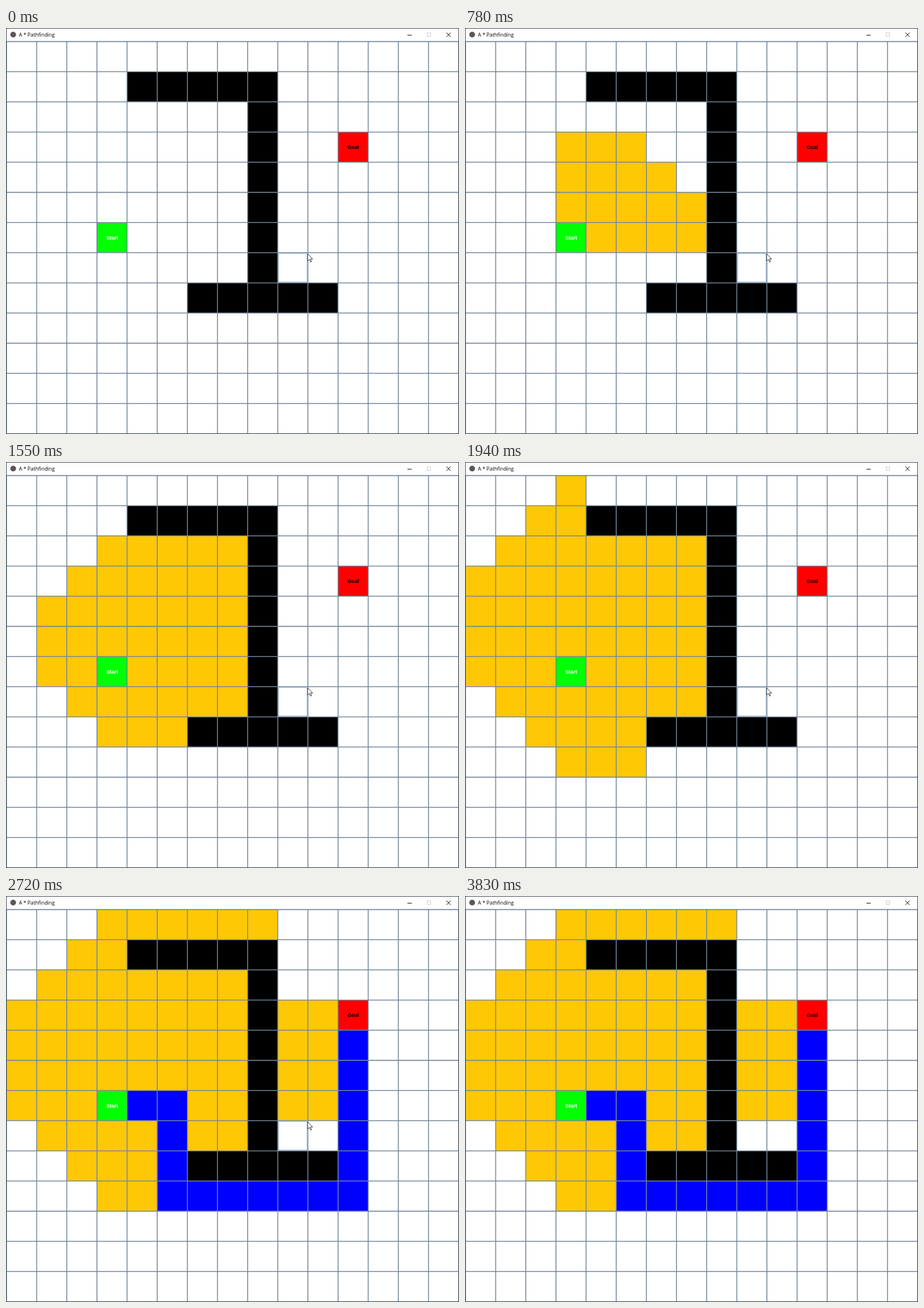
Write an HTML page that moves like this. It is 791x708 px and loops after 3910 ms.

```html
<!DOCTYPE html>
<html lang="en">
<head>
<meta charset="utf-8">
<title>A * Pathfinding</title>
<style>
  html, body { margin: 0; width: 100%; height: 100%; overflow: hidden; background: #fff; }
  svg { display: block; }
  .title { font: 8.9px "Open Sans", sans-serif; }
  .label { font: bold 9px "Liberation Sans", Arial, sans-serif; text-anchor: middle; }
</style>
</head>
<body>
<svg id="stage" width="791" height="708" viewBox="0 0 791 708">
  <rect width="791" height="708" fill="#fff"/>
  <g id="cells"></g>
  <path id="grid" fill="none" stroke="#74869a" stroke-width="1.55"/>
  <rect id="hover" width="50" height="50" fill="none" stroke="#a9bed3" stroke-width="1.7"/>
  <text class="label" x="185.5" y="369" fill="#fff">Start</text>
  <text class="label" x="606.5" y="211" fill="#000">Goal</text>
  <circle cx="12.5" cy="11.5" r="5" fill="#5c5658"/>
  <text class="title" x="22.5" y="15">A * Pathfinding</text>
  <g fill="none" stroke="#000">
    <path d="M701 12.5h7.5"/>
    <rect x="735.5" y="8.5" width="6" height="6" stroke="#ccc"/>
    <path d="M769 8l7.5 7.5M776.5 8l-7.5 7.5"/>
    <rect x=".5" y=".5" width="790" height="707" stroke="#3f4952"/>
  </g>
  <path id="cursor" d="M0 0v12.2l2.8-2.6 2 4.6 2-.9-2-4.4h3.9z" fill="#fff" stroke="#000" stroke-width=".8"/>
</svg>
<script>
const COLS = 15, ROWS = 13, PITCH = 52.63, LEFT = 0.9, TOP = 23.6, ROW_PITCH = 52.6;
const LOOP = 3910, SEARCH_START = 290, MS_PER_NODE = 29.5;
const SEARCH_TICKS = [
  320, 400, 480, 550, 630, 710, 780, 870, 950, 1030, 1100, 1180, 1250, 1320,
  1410, 1490, 1560, 1640, 1720, 1790, 1870, 1940, 2010, 2090, 2170, 2250, 2320, 2400,
  2490, 2570, 2640, 2720
];
const MOVE_TICKS = [3290, 3370, 3440, 3520, 3600, 3670, 3750];
const CURSOR_GONE = 3830;

const $ = id => document.getElementById(id);
const cellX = c => LEFT + c * PITCH;
const cellY = r => TOP + r * ROW_PITCH;

const isWall = (c, r) =>
  (r === 1 && c >= 4 && c <= 8) ||
  (c === 8 && r >= 1 && r <= 8) ||
  (r === 8 && c >= 6 && c <= 10);

const nodes = [];
for (let r = 0; r < ROWS; r++) {
  for (let c = 0; c < COLS; c++) {
    const rect = document.createElementNS("http://www.w3.org/2000/svg", "rect");
    const attrs = { x: cellX(c), y: cellY(r), width: PITCH, height: ROW_PITCH };
    for (const name in attrs) rect.setAttribute(name, attrs[name]);
    $("cells").append(rect);
    nodes.push({ c, r, rect, wall: isWall(c, r) });
  }
}
const nodeAt = (c, r) => c >= 0 && c < COLS && r >= 0 && r < ROWS ? nodes[r * COLS + c] : null;
const start = nodeAt(3, 6), goal = nodeAt(11, 3);
const distance = (a, b) => Math.abs(a.c - b.c) + Math.abs(a.r - b.r);

// Costs are plain Manhattan distances; ties go to the node nearest the start.
function search() {
  for (const n of nodes) {
    n.g = distance(n, start);
    n.f = n.g + distance(n, goal);
  }
  const open = [start], seen = new Set(open), order = [];
  while (open.length) {
    const current = open.reduce((best, n) =>
      n.f < best.f || (n.f === best.f && n.g < best.g) ? n : best);
    if (current === goal) break;
    open.splice(open.indexOf(current), 1);
    if (current !== start) order.push(current);
    for (const [dc, dr] of [[0, -1], [-1, 0], [0, 1], [1, 0]]) {
      const next = nodeAt(current.c + dc, current.r + dr);
      if (!next || next.wall || seen.has(next)) continue;
      seen.add(next);
      next.parent = current;
      open.push(next);
    }
  }
  const path = new Set();
  for (let n = goal.parent; n !== start; n = n.parent) path.add(n);
  return { order, path };
}

const { order, path } = search();
order.forEach((n, i) => n.rank = i);

let lines = "";
for (let c = 0; c <= COLS; c++) lines += `M${cellX(c)} ${TOP}V${cellY(ROWS)}`;
for (let r = 0; r <= ROWS; r++) lines += `M${LEFT} ${cellY(r)}H${cellX(COLS)}`;
$("grid").setAttribute("d", lines);

function colour(node, count) {
  if (node === start) return "#0f0";
  if (node === goal) return "#f00";
  if (node.wall) return "#000";
  if (count > order.length && path.has(node)) return "#00f";
  return node.rank < count ? "#ffc805" : "#fff";
}

function render(t) {
  const tick = SEARCH_TICKS.filter(v => v <= t).pop() || 0;
  const count = Math.max(0, Math.floor((tick - SEARCH_START) / MS_PER_NODE));
  for (const n of nodes) n.rect.setAttribute("fill", colour(n, count));

  const moved = MOVE_TICKS.filter(v => v <= t).length / MOVE_TICKS.length;
  const eased = moved ** 1.5;
  const x = 526.8 - 57 * eased, y = 394 + 300 * eased;
  const row = Math.floor((y - TOP) / ROW_PITCH);
  $("cursor").setAttribute("transform", `translate(${x} ${y})`);
  $("hover").setAttribute("x", cellX(9) + 1.3);
  $("hover").setAttribute("y", cellY(row) + 1.3);
  const visibility = t < CURSOR_GONE ? "visible" : "hidden";
  $("cursor").setAttribute("visibility", visibility);
  $("hover").setAttribute("visibility", visibility);
}

const began = performance.now();
function frame() {
  render((performance.now() - began) % LOOP);
  requestAnimationFrame(frame);
}
frame();
</script>
</body>
</html>
```
